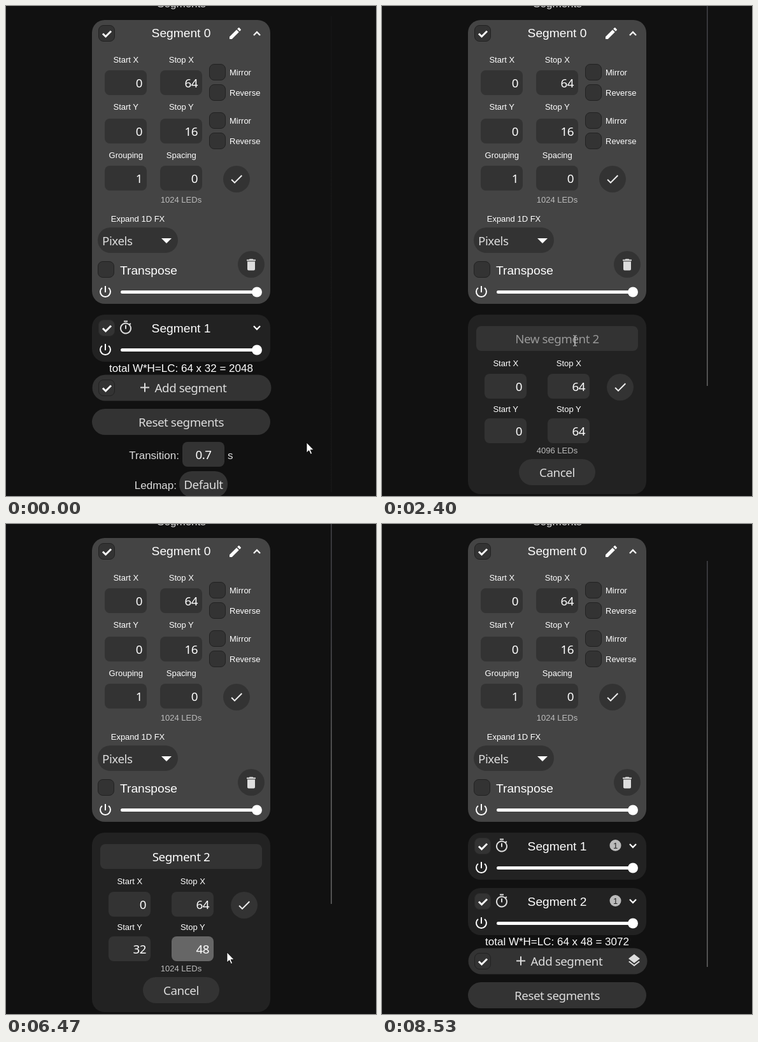
Write an HTML page that moves like this. It is 581 by 770 pixels and loops after 8.94 s.

```html
<!DOCTYPE html>
<html lang="en">
<head>
<meta charset="utf-8">
<title>Segments</title>
<style>
html, body { margin: 0; width: 100%; height: 100%; overflow: hidden; background: #111; }
svg { display: block; }
text { white-space: pre; fill: #fff; font: 13px "Liberation Sans", Arial, sans-serif; }
.mid { font-size: 17px; }
.big { font-size: 19.2px; }
.ui { font: 18.8px "Noto Sans", Tahoma, sans-serif; letter-spacing: -.45px; }
</style>
</head>
<body>
<svg id="stage" width="581" height="770" viewBox="0 0 581 770">
  <defs><linearGradient id="bar" gradientUnits="userSpaceOnUse" x1="0" y1="0" x2="0" y2="770">
    <stop offset=".2" stop-color="#444449"/><stop offset=".5" stop-color="#666"/>
  </linearGradient></defs>
  <g id="top"></g><g id="bottom"></g><g id="line"></g><g id="pointer"></g>
</svg>
<script>
const LOOP = 8940;
const $ = id => document.getElementById(id);

const ICON = {
  edit: 'M3 17.25V21h3.75L17.81 9.94l-3.75-3.75zM20.71 7.04c.39-.39.39-1.02 0-1.41l-2.34-2.34c-.39-.39-1.02-.39-1.41 0l-1.83 1.83 3.75 3.75z',
  check: 'M9 16.17L4.83 12l-1.42 1.41L9 19 21 7l-1.41-1.41z',
  trash: 'M6 19c0 1.1.9 2 2 2h8c1.1 0 2-.9 2-2V7H6zM19 4h-3.5l-1-1h-5l-1 1H5v2h14z',
  power: 'M13 3h-2v10h2zm4.83 2.17l-1.42 1.42A7 7 0 1 1 7.58 6.58L6.17 5.17a9 9 0 1 0 11.66 0z',
  timer: 'M15 1H9v2h6zm-4 13h2V8h-2zm8.03-6.61l1.42-1.42c-.43-.51-.9-.99-1.41-1.41l-1.42 1.42A9 9 0 1 0 19.03 7.39zM12 20a7 7 0 1 1 0-14 7 7 0 0 1 0 14z',
  layers: 'M11.99 18.54l-7.37-5.73L3 14.07l9 7 9-7-1.63-1.27zM12 16l7.36-5.73L21 9l-9-7-9 7 1.63 1.27z'
};
const CURSOR = {
  arrow: '<path d="M0 0v16l3.7-3.5 2.6 5.8 2.3-1-2.5-5.7h5z" fill="#fff" stroke="#000" stroke-width=".8"/>',
  hand: '<path d="M-1.6 1.5q1.6-2.6 3.2 0V8q5 .5 7.4 2.2 1 1 .7 4.3l-1.7 4V22h-8.5v-2.5l-5-6.5q-.8-2 1-2.2l2.9 2.4z" fill="#fff" stroke="#000" stroke-width=".9"/>' +
    '<path d="M1.5 15v4M4 15v4M6.5 15v4" stroke="#333" stroke-width=".8"/>',
  beam: '<path d="M-3-8h2q1 0 1 1V7q0 1-1 1h-2M3-8h-2q-1 0-1 1V7q0 1 1 1h2" fill="none" stroke="#ccc"/>'
};

const rect = (x, y, w, h, r, fill = '#333', more = '') =>
  `<rect x="${x}" y="${y}" width="${w}" height="${h}" rx="${r}" fill="${fill}" ${more}/>`;
const text = (x, y, s, cls = '', anchor = 'middle', fill = '#fff', more = '') =>
  `<text x="${x}" y="${y}" class="${cls}" text-anchor="${anchor}" style="fill:${fill}" ${more}>${s}</text>`;
const circle = (x, y, r, fill = '#333') => `<circle cx="${x}" cy="${y}" r="${r}" fill="${fill}"/>`;
const icon = (name, x, y, fill = '#fff') =>
  `<path d="${ICON[name]}" transform="translate(${x - 12} ${y - 12})" fill="${fill}"/>`;
const stroke = (d, w, color = '#fff') =>
  `<path d="${d}" fill="none" stroke="${color}" stroke-width="${w}"/>`;
const box = (x, y, on, edge = '#222') =>
  rect(x - 12.5, y - 12.5, 25, 25, 7.5, '#333', `stroke="${edge}"`) +
  (on ? stroke(`M${x - 6} ${y + .5}l4.5 4.5 8.5-8.5`, 3) : '');
const field = (x, y, value, fill) =>
  rect(x, y, 66, 39, 8, fill) + text(x + 59, y + 27, value, 'ui', 'end');
const labelled = (x, y, label, value, fill) =>
  text(x + 33.3, y - 12, label) + field(x, y, value, fill);
const button = (x, y, r = 21, fill) => circle(x, y, r, fill);
const slider = y => icon('power', 156, y) + rect(180, y - 2, 216, 5, 2.5, '#fff') + circle(394, y + .5, 8, '#fff');

function openSegment() {
  let s = text(275.5, 2, 'Segments', 'mid', 'middle', '#ddd') + rect(135, 22, 280, 446, 20, '#444') +
    box(158, 43, true) + text(275, 49, 'Segment 0', 'big') + icon('edit', 360, 43) +
    stroke('M389 46l5-5 5 5', 2.3) +
    labelled(155, 101, 'Start X', 0) + labelled(242, 101, 'Stop X', 64) +
    text(188.3, 163, 'Start Y') + field(155, 177, 0) + text(275.3, 163, 'Stop Y') + field(242, 177, 16) +
    labelled(155, 251, 'Grouping', 1) + labelled(242, 251, 'Spacing', 0);
  for (const y of [104, 180]) {
    s += box(332, y) + text(351, y + 5, 'Mirror', '', 'start') +
      box(332, y + 32) + text(351, y + 37, 'Reverse', '', 'start');
  }
  return s + button(362, 272) + icon('check', 362, 272, '#eee') +
    text(275, 309, '1024 LEDs', '', 'middle', '#bbb') + text(207, 339, 'Expand 1D FX') +
    rect(144, 348, 126, 40, 20) + text(151, 376, 'Pixels', 'ui', 'start', '#ddd') +
    '<path d="M244 365h16l-8 8z" fill="#fff"/>' +
    box(157, 414) + text(179, 422, 'Transpose', 'big', 'start') +
    button(385, 406) + icon('trash', 385, 406.5, '#ddd') + slider(449);
}

function closedSegment(y, n, badge) {
  return rect(135, y, 280, 74, 20, '#222') + box(158, y + 21, true, '#2b2b2b') +
    icon('timer', 188, y + 20.5, '#ddd') + text(275, y + 28, 'Segment ' + n, 'big') +
    stroke(`M389 ${y + 18}l5 5 5-5`, 2.3) + slider(y + 55) +
    (badge ? circle(366.5, y + 20, 9, '#bbb') + text(366.5, y + 25, 1, '', 'middle', '#222') : '');
}

function list(added, checked, hover, fresh) {
  const dy = added ? 87 : 0, y = 579 + dy;
  return closedSegment(485, 1, added) + (added ? closedSegment(572, 2, true) : '') +
    text(275, y - 4, 'total W*H=LC: 64 x ' + (added ? '48 = 3072' : '32 = 2048'), 'mid') +
    rect(135.5, y + .5, 281, 41, 20.5, fresh ? '#2b2b2b' : hover == 'add' ? '#555' : '#333',
      hover == 'add' ? 'stroke="#5a5a5a"' : '') +
    box(158, y + 21, checked) + stroke(`M211 ${y + 20.5}h14M218 ${y + 13.5}v14`, 2, '#ddd') +
    text(233.5, y + 28, 'Add segment', 'ui', 'start', '#ddd') +
    (added ? icon('layers', 396, y + 20, '#ddd') : '') +
    rect(135, y + 54, 280, 41, 20.5, hover == 'reset' ? '#555' : '#333') +
    text(275, y + 82, 'Reset segments', 'ui', 'middle', '#ddd') +
    text(272, y + 133, 'Transition:', 'mid', 'end', '#ddd') + rect(277, y + 106, 66, 39, 8) +
    text(310, y + 133, '0.7', 'ui') + text(348, y + 133, 's', 'mid', 'start', '#ddd') +
    text(268, y + 180, 'Ledmap:', 'mid', 'end', '#ddd') + rect(272, y + 152, 76, 41, 20) +
    text(310, y + 180, 'Default', 'ui', 'middle', '#ddd');
}

// Moments at which each character lands in the name field
const KEYS = [2800, 3000, 3130, 3400, 3470, 3530, 3600, 3730, 3870];

function form(t, hover) {
  const focus = t < 2600 ? '' : t < 4600 ? 'name' : t < 5470 ? 'start' : 'stop';
  const fill = f => f == focus ? '#666' : '#333';
  const name = 'Segment 2'.slice(0, KEYS.filter(k => t >= k).length);
  const start = t < 4730 ? 0 : t < 4870 ? 3 : 32;
  const stop = t < 5670 ? 64 : t < 5800 ? 4 : 48;
  const caret = (x, y) => rect(x, y, 1, 23, 0, '#fff', 'id="caret"');
  return rect(135, 485, 280, 282, 20, '#222') + rect(148, 503, 254, 39, 8, fill('name')) +
    (focus ? text(275, 530, name, 'ui', 'middle', '#fff', 'id="name"')
           : text(275, 530, 'New segment 2', 'ui', 'middle', '#999')) +
    labelled(161, 578, 'Start X', 0) + labelled(260, 578, 'Stop X', 64) +
    text(194.3, 638, 'Start Y') + field(161, 648, start, fill('start')) +
    text(293.3, 638, 'Stop Y') + field(260, 648, stop, fill('stop')) +
    button(374, 599, 21, hover == 'ok' ? '#555' : '#333') + icon('check', 374, 599, '#eee') +
    text(275, 703, 64 * Math.max(0, stop - start) + ' LEDs', '', 'middle', '#bbb') +
    rect(215, 712, 120, 41, 20.5) + text(275, 740, 'Cancel', 'ui', 'middle', '#ddd') +
    (focus == 'name' ? caret(275, 511) : focus == 'start' ? caret(218, 656) :
      focus == 'stop' && t < 6330 ? caret(317, 656) : '');
}

// Pointer stops: time, x, y
const PATH = [
  [0, 472, 686], [930, 300, 616], [1730, 281, 607], [1870, 281, 607], [2330, 303, 526], [4270, 303, 526],
  [4600, 197, 668], [4860, 197, 668], [5130, 304, 661], [5200, 304, 661], [5330, 308, 661], [5470, 308, 661],
  [5670, 346, 687], [5800, 349, 682], [5930, 349, 682], [6070, 346, 677], [6400, 346, 677],
  [6930, 377, 603], [7330, 377, 603], [8270, 145, 733], [LOOP, 145, 733]
];
function pointerAt(t) {
  const i = PATH.findIndex(p => p[0] > t), [t0, x0, y0] = PATH[i - 1], [t1, x1, y1] = PATH[i];
  const u = (t - t0) / (t1 - t0), e = u * u * (3 - 2 * u);
  return [x0 + (x1 - x0) * e, y0 + (y1 - y0) * e];
}

const shown = {};
function put(id, html) {
  if (shown[id] === html) return;
  $(id).innerHTML = shown[id] = html;
}

function draw(now) {
  const frame = Math.floor((now % LOOP + 5) / (200 / 3));
  const t = Math.min(Math.round(frame * 20 / 3) * 10, LOOP - 1);
  const [x, y] = pointerAt(t);
  const inside = (l, top, w, h) => x >= l && x <= l + w && y >= top && y <= top + h;
  const isForm = t >= 1800 && t < 7200, added = t >= 7330, dy = added ? 87 : 0;
  let hover = '', kind = 'arrow';

  if (t >= 8330) kind = '';
  else if (isForm) {
    if (inside(353, 578, 42, 42)) hover = 'ok';
    const onField = inside(148, 503, 254, 39) ||
      [578, 648].some(fy => inside(161, fy, 66, 39) || inside(260, fy, 66, 39));
    const typing = t >= 2800 && t < 4330 || t >= 4730 && t < 4930;
    kind = typing ? '' : onField ? 'beam' : hover ? 'hand' : 'arrow';
  } else {
    if (inside(135, 579 + dy, 282, 42)) hover = 'add';
    else if (inside(135, 633 + dy, 280, 41)) hover = 'reset';
    if (hover || added && inside(135, 572, 280, 74)) kind = 'hand';
  }

  put('bottom', isForm ? form(t, hover) : list(added, t < 1800 || added, hover, t >= 7200 && !added));
  if ($('name') && $('caret') && t < 4600) {
    $('caret').setAttribute('x', Math.round(274.5 + $('name').getComputedTextLength() / 2));
  }
  const [from, to] = isForm ? [0, 597] : t >= 7400 ? [58, 696] : [16, 764];
  put('line', rect(510, from, 1.5, to - from, 0, 'url(#bar)', `opacity="${Math.min(1, .08 + t / 270)}"`));
  put('pointer', kind && `<g transform="translate(${Math.round(x)} ${Math.round(y)})">${CURSOR[kind]}</g>`);
}

put('top', openSegment());
const begin = performance.now();
function tick() {
  draw(performance.now() - begin);
  requestAnimationFrame(tick);
}
tick();
</script>
</body>
</html>
```
